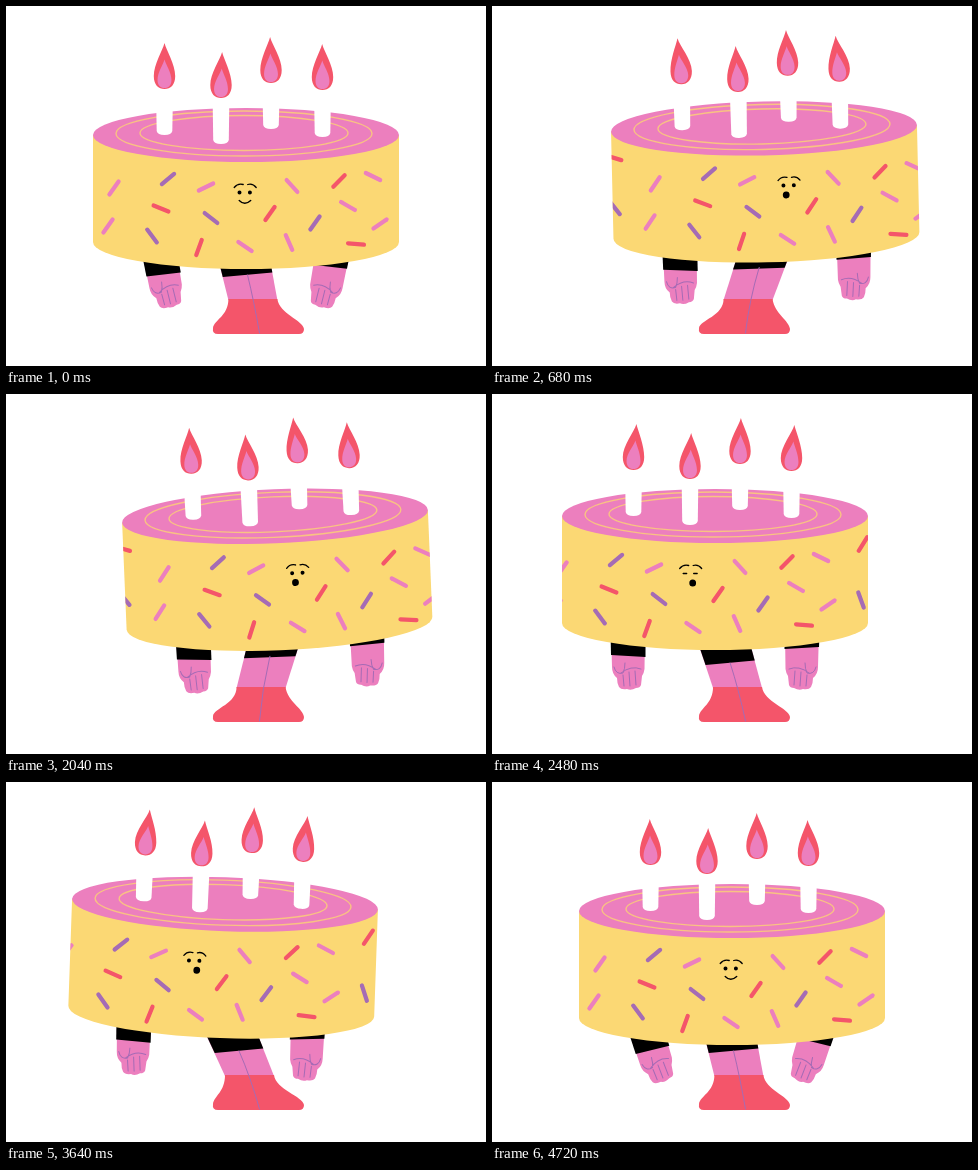
Write an HTML page with a canvas that moves like this. It is 480 by 360 pixels and loops after 4.76 s.

```html
<!DOCTYPE html>
<html lang="en">
<head>
<meta charset="utf-8">
<title>Birthday cake</title>
<style>
  html, body { margin: 0; height: 100%; overflow: hidden; background: #fff; }
  canvas { display: block; }
</style>
</head>
<body>
<canvas id="stage" width="480" height="360"></canvas>
<script>
const ctx = document.getElementById('stage').getContext('2d');
const LOOP = 4760, STEP = 40;
const PINK = '#ec7fbe', RED = '#f4556a', YELLOW = '#fbd874', PURPLE = '#a56bb5', RING = '#f9c283', BLACK = '#000';
const RX = 153, RY = 27, HEIGHT = 107;

// time, x, y, tilt, turn, hip x, arm swing (degrees)
const KEYS = [
  [0, 240, 129, 0, 0, 240, 10],
  [560, 268.5, 123.3, -1, 20, 263, 1],
  [680, 272, 122.4, -1.3, 22, 267, 0],
  [1400, 274.5, 122.5, -2.2, 24, 270, 0],
  [1720, 274, 122.3, -2.5, 23.5, 269, 0],
  [2040, 269, 122.3, -2.4, 19, 264, 0],
  [2240, 247, 122.5, -1.6, 0, 250, 0],
  [2480, 223, 122, 0, -21, 236, 0],
  [2800, 217, 122, 0.9, -25, 231, 0],
  [3360, 217.5, 122, 1.8, -25, 229.5, 0],
  [3640, 219, 122.2, 2, -24.6, 230, 0],
  [3920, 231, 126, 1.1, -12, 235, 6],
  [4280, 240, 129, 0, 0, 240, 13],
  [4760, 240, 129, 0, 0, 240, 17]
];

// x, y, angle, colour, relative to the centre of the top
const SPRINKLES = [
  [-173, 26, 18, RED], [-173, 76, 53, PURPLE],
  [-132, 53, -55, PINK], [-78, 44, -40, PURPLE], [-40, 52, -26, PINK],
  [-85, 73.5, 22, RED], [-138, 91, -55, PINK], [-94, 101, 53, PURPLE],
  [-47, 112.5, -70, RED], [-35, 83, 38, PURPLE], [-1, 111.5, 34, PINK],
  [24, 78.5, -55, RED], [46, 51, 48, PINK], [43, 107.5, 66, PINK],
  [69, 88, -55, PURPLE], [93, 46, -45, RED], [102, 71, 30, PINK],
  [110, 109, 5, RED], [127, 41.5, 26, PINK], [134, 89, -35, PINK],
  [169, 28, -58, RED], [167, 84, 70, PURPLE]
];

// x, candle foot, flame foot
const CANDLES = [[-81.5, 0, -46], [-25, 9, -37], [25, -6, -52], [76.5, 2, -45]];

function slope(i, c) {
  if (i === 0 || i === KEYS.length - 1) return 0;
  const rate = j => (KEYS[j + 1][c] - KEYS[j][c]) / (KEYS[j + 1][0] - KEYS[j][0]);
  const a = rate(i - 1), b = rate(i);
  return a * b > 0 ? 2 * a * b / (a + b) : 0;
}

function poseAt(t) {
  const i = KEYS.findIndex((k, j) => t < KEYS[j + 1][0]);
  const a = KEYS[i], b = KEYS[i + 1], span = b[0] - a[0], u = (t - a[0]) / span;
  const [x, y, tilt, turn, hip, swing] = [1, 2, 3, 4, 5, 6].map(c =>
    a[c] + (b[c] - a[c]) * u * u * (3 - 2 * u) +
    span * u * (1 - u) * (slope(i, c) * (1 - u) - slope(i + 1, c) * u));
  return { x, y, tilt, turn, hip, swing };
}

const rad = deg => deg * Math.PI / 180;

function fill(path, colour) {
  ctx.fillStyle = colour;
  ctx.fill(new Path2D(path));
}

function stroke(path, colour, width) {
  ctx.strokeStyle = colour;
  ctx.lineWidth = width;
  ctx.stroke(new Path2D(path));
}

function ellipse(x, y, rx, ry) {
  return `M${x - rx} ${y}a${rx} ${ry} 0 1 1 ${2 * rx} 0a${rx} ${ry} 0 1 1 ${-2 * rx} 0z`;
}

function place(x, y, angle, draw) {
  ctx.save();
  ctx.translate(x, y);
  ctx.rotate(rad(angle));
  draw();
  ctx.restore();
}

function drawLegs(hip) {
  const ankle = 243.5 + (hip - 230) * 0.34, l = ankle - 24.5, r = ankle + 24.5;
  const lift = Math.max(0, hip - 240);
  const hemL = 271 - lift * 0.28, hemR = 266.5 - lift * 0.18;
  const edge = (side, y) => hip + side * 25.5 + (ankle - hip - side) * (y - 262) / 31;
  fill(`M${edge(-1, 240)} 240L${edge(1, 240)} 240L${r} 294L${l} 294z`, PINK);
  fill(`M${edge(-1, 240)} 240L${edge(1, 240)} 240L${edge(1, hemR)} ${hemR}L${edge(-1, hemL)} ${hemL}z`, BLACK);
  fill(`M${l} 293L${r} 293C${r + 2} 308 297 314 298 323Q298 328 293 328L212 328Q206 328 207 322C208 314 ${l} 310 ${l} 293z`, RED);
  stroke(`M${edge(0, hemL - 2)} ${hemL - 2}Q${ankle + 1} 295 253.5 327`, PURPLE, 1);
}

function drawArm(side, swing) {
  place(side * 87, 115, side * swing, () => {
    const hem = side < 0 ? 25 : 17;
    ctx.scale(-side, 1);
    fill('M-17 0L17 0L16.5 38Q16 42 14 45L13 54Q12 57 8 57Q3 60 -1 58Q-7 59 -9 56Q-11 52 -11 47Q-16 43 -16 36z', PINK);
    fill(`M-17.5 0L17.5 0L17.5 ${hem + 1}L-17 ${hem - 1}z`, BLACK);
    stroke('M-14 36Q-12 44 -5 42Q-3 38 -3 32M-7 42Q3 34 13 38M-5 44L-4 55M1 41L2 55M7 40L8 54', PURPLE, 1);
  });
}

function drawFace(t, turn) {
  place(-1.3 + turn * 1.12, 57.5, 0, () => {
    const mouthX = turn * -0.12;
    stroke('M-10.5 -5Q-7 -9.5 -1.5 -8M3 -8Q8 -9.5 11.5 -5', BLACK, 1.3);
    if (t >= 2400 && t < 2560) {
      stroke('M-7 0H-3.5M3.5 0H7', BLACK, 1.3);
    } else {
      fill(ellipse(-5.2, 0, 2, 2) + ellipse(5.2, 0, 2, 2), BLACK);
    }
    if (t < 280 || t >= 4120) stroke('M-5.5 8Q0 13.5 6 8', BLACK, 1.4);
    else fill(ellipse(mouthX, 9.5, 3.4, 3.5), BLACK);
  });
}

function drawFlame(x, y, lean) {
  const path = `M${lean} -46C${lean + 2} -38 10.7 -25 10.7 -13C10.7 -4 6 0 0 0C-6 0 -10.7 -4 -10.7 -13C-10.7 -25 ${lean - 2} -38 ${lean} -46z`;
  place(x, y, 0, () => {
    fill(path, RED);
    ctx.translate(0, -1);
    ctx.scale(0.65, 0.62);
    fill(path, PINK);
  });
}

function drawCake(t, turn) {
  const side = `M${-RX} 0V${HEIGHT}A${RX} ${RY} 0 0 0 ${RX} ${HEIGHT}V0z`;
  fill(side, YELLOW);
  ctx.save();
  ctx.clip(new Path2D(side));
  for (const [x, y, angle, colour] of SPRINKLES) {
    place(x + turn, y, angle, () => stroke('M-8 0H8', colour, 4.2));
  }
  drawFace(t, turn);
  ctx.restore();

  fill(ellipse(0, 0, RX, RY), PINK);
  stroke(ellipse(-2, -1.5, 128, 22.5), RING, 1.4);
  stroke(ellipse(-2, -2, 104, 17.5), RING, 1.4);
  CANDLES.forEach(([x, foot, flame], i) => {
    fill(`M${x - 8.3} -32H${x + 8.3}L${x + 7.8} ${foot - 4}Q${x + 7} ${foot} ${x} ${foot}Q${x - 7} ${foot} ${x - 7.8} ${foot - 4}z`, '#fff');
    const flicker = Math.sin(t / LOOP * Math.PI * 24 + i * 2);
    drawFlame(x, flame, turn * -0.08 + flicker * 1.2);
  });
}

function render(t) {
  const { x, y, tilt, turn, hip, swing } = poseAt(t);
  ctx.fillStyle = '#fff';
  ctx.fillRect(0, 0, 480, 360);
  ctx.lineCap = 'round';
  drawLegs(hip);
  place(x, y, tilt, () => {
    drawArm(-1, swing);
    drawArm(1, swing);
    drawCake(t, turn);
  });
}

const start = performance.now();
function tick() {
  const t = (performance.now() - start) % LOOP;
  render(Math.floor(t / STEP) * STEP);
  requestAnimationFrame(tick);
}
tick();
</script>
</body>
</html>
```
